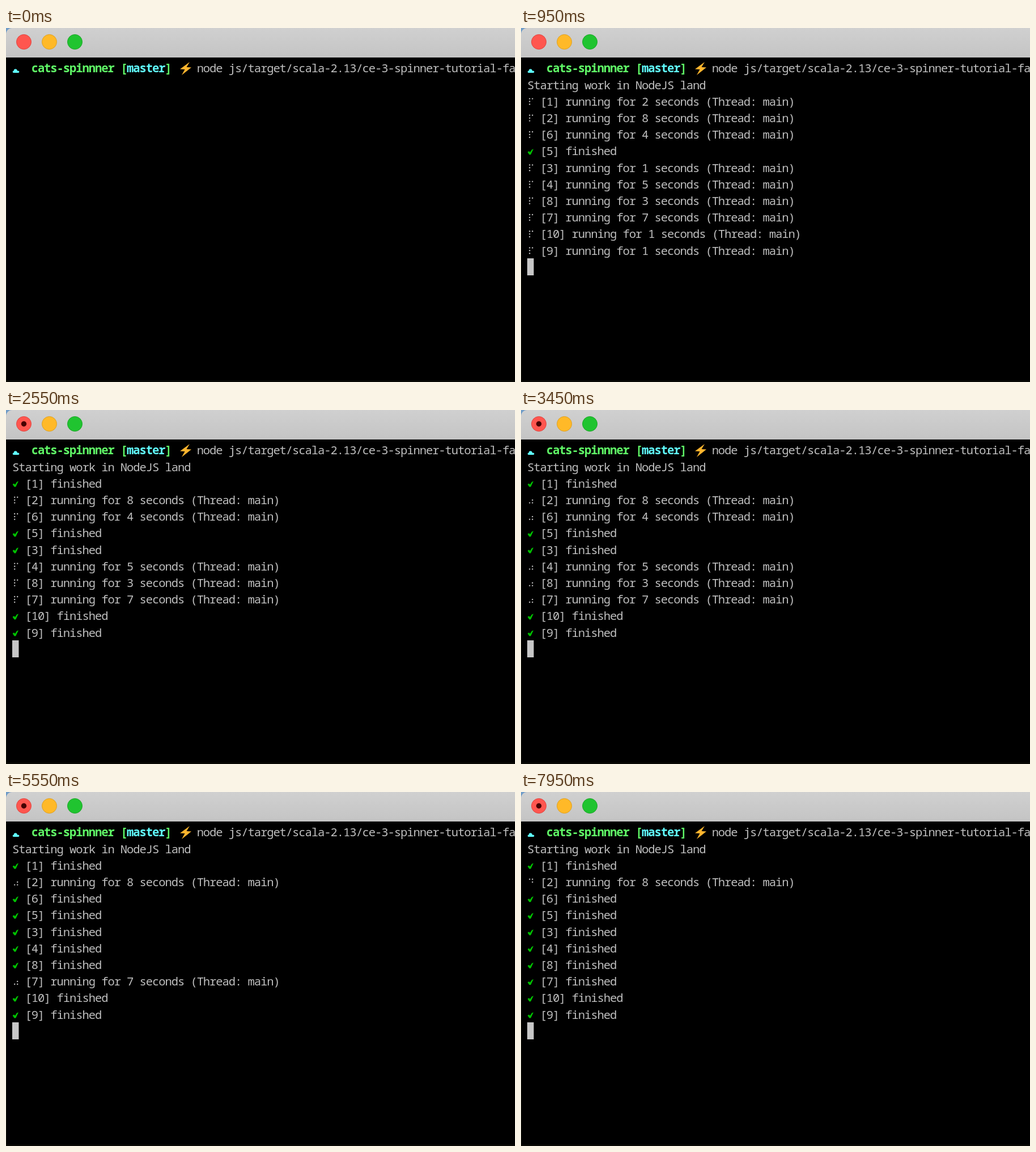
These frames come from a looping animation (898x624 px, 8000 ms). An HTML page with a canvas:

```html
<!DOCTYPE html>
<html lang="en">
<head>
<meta charset="utf-8">
<title>Terminal spinners</title>
<style>
  html, body { margin: 0; width: 100%; height: 100%; overflow: hidden; background: #000; }
  canvas { display: block; }
</style>
</head>
<body>
<canvas id="stage" width="898" height="624"></canvas>
<script>
const ctx = document.getElementById('stage').getContext('2d');
const W = 898, H = 624, LOOP = 8000, TICK = 50, BAR = 52;
const LEFT = 11.5, CELL = 11.23, TOP = 56.6, ROW = 29.2, BASE = 21.7;
const SIZE = 20.5;
const FONT = SIZE + 'px "Noto Sans Mono", "DejaVu Sans Mono", monospace';
const GRAY = '#bfbfbf', GREEN = '#60fa67', CYAN = '#60fdff', CHECK = '#00c200';

const ENTER = 250, START = 500, BUSY = 1350;

// [task id, seconds it runs], in display order
const TASKS = [[1, 2], [2, 8], [6, 4], [5, 0], [3, 1], [4, 5], [8, 3], [7, 7], [10, 1], [9, 1]];
const SPINNER = [...'⠋⠙⠹⠸⠼⠴⠦⠧⠇⠏'];

const colX = col => LEFT + col * CELL;
const rowY = row => TOP + row * ROW;

// The terminal grid is set a little tighter than the font's own advance of 0.6 em.
const TRACKING = CELL - SIZE * 0.6;

function text(str, col, row, color = GRAY, bold = false) {
  ctx.font = (bold ? 'bold ' : '') + FONT;
  ctx.letterSpacing = TRACKING + 'px';
  ctx.fillStyle = color;
  ctx.fillText(str, colX(col) + TRACKING / 2, rowY(row) + BASE);
}

function circle(x, y, r, fill, stroke) {
  ctx.beginPath();
  ctx.arc(x, y, r, 0, Math.PI * 2);
  ctx.fillStyle = fill;
  ctx.fill();
  if (stroke) {
    ctx.strokeStyle = stroke;
    ctx.lineWidth = 1;
    ctx.stroke();
  }
}

function polygon(points, x, y, fill) {
  ctx.beginPath();
  points.forEach(([px, py]) => ctx.lineTo(x + px, y + py));
  ctx.closePath();
  ctx.fillStyle = fill;
  ctx.fill();
}

function drawWindow(t) {
  ctx.fillStyle = '#000';
  ctx.fillRect(0, 0, W, H);
  ctx.fillStyle = '#16160c';
  ctx.fillRect(0, BAR, 1, H - BAR);
  ctx.fillRect(0, H - 2, W, 1);

  ctx.fillStyle = '#6f9cc8';
  ctx.fillRect(0, 0, 20, 20);
  const bar = ctx.createLinearGradient(0, 0, 0, BAR);
  bar.addColorStop(0, '#d0d0d0');
  bar.addColorStop(1, '#c4c4c4');
  ctx.fillStyle = bar;
  ctx.beginPath();
  ctx.roundRect(0, 0, W + 20, BAR, [11, 0, 0, 0]);
  ctx.fill();

  circle(31.5, 24.5, 13, '#ff564f', '#df4540');
  circle(76.5, 24.5, 13, '#ffb928', '#dea021');
  circle(121.5, 24.5, 13, '#20c430', '#1aa626');
  if (t >= BUSY) circle(31.5, 24.5, 4.7, '#470000');
}

function drawPrompt() {
  ctx.fillStyle = CYAN;
  ctx.beginPath();
  ctx.arc(16.7, 75.3, 3, Math.PI, 0);
  ctx.lineTo(21, 75.5);
  ctx.arc(21.6, 77.2, 1.8, -Math.PI / 2, Math.PI / 2);
  ctx.lineTo(13.5, 79);
  ctx.arc(13.5, 77.2, 1.8, Math.PI / 2, -Math.PI / 2);
  ctx.fill();

  text('cats-spinnner', 3, 0, GREEN, true);
  text('[', 17, 0, GREEN, true);
  text('master', 18, 0, CYAN, true);
  text(']', 24, 0, GREEN, true);
  const bolt = [[18, 0], [1, 12.5], [9.5, 13], [4, 23], [21, 9.5], [12.5, 9]];
  polygon(bolt, 306, 60, '#ffb52e');
  text('node js/target/scala-2.13/ce-3-spinner-tutorial-fa', 29, 0);
}

// The spinner speeds up slightly as rows finish.
function spinStep(t) {
  const bend = 3450;
  const steps = (Math.min(t, bend) - 458) / 53.6 + Math.max(0, t - bend) / 52.55;
  return Math.floor(steps) % SPINNER.length;
}

// Braille bits 0-2 fill the left column, bits 3-5 the right one.
function drawSpinner(row, step) {
  const bits = SPINNER[step].charCodeAt(0) - 0x2800;
  for (let i = 0; i < 6; i++) {
    if (bits >> i & 1) {
      circle(15.2 + 5 * Math.floor(i / 3), rowY(row) + 9.6 + 4.9 * (i % 3), 1.2, GRAY);
    }
  }
}

function drawCheck(row) {
  const tick = [[0, 6.5], [2.6, 4.9], [4.3, 6.8], [7.4, 2.2], [10.4, 1], [5.6, 11], [3, 11]];
  polygon(tick, 11.6, rowY(row) + 9.6, CHECK);
}

function drawTask([id, secs], i, t) {
  const row = i + 2;
  const done = t >= START + secs * 1000;
  if (done) drawCheck(row);
  else drawSpinner(row, spinStep(t));
  text(`[${id}] ` + (done ? 'finished' : `running for ${secs} seconds (Thread: main)`), 2, row);
}

function drawCursor(row) {
  ctx.fillStyle = '#c7c7c7';
  ctx.fillRect(11, Math.floor(rowY(row)) - 1, 11.5, 30);
}

function draw(now) {
  const t = Math.floor((now % LOOP) / TICK) * TICK;
  drawWindow(t);
  drawPrompt();
  if (t >= START) {
    text('Starting work in NodeJS land', 0, 1);
    TASKS.forEach((task, i) => drawTask(task, i, t));
    drawCursor(TASKS.length + 2);
  } else if (t >= ENTER) {
    drawCursor(1);
  }
}

let begin;
function frame(now) {
  begin ??= now;
  draw(now - begin);
  requestAnimationFrame(frame);
}
draw(0);
requestAnimationFrame(frame);
</script>
</body>
</html>
```
